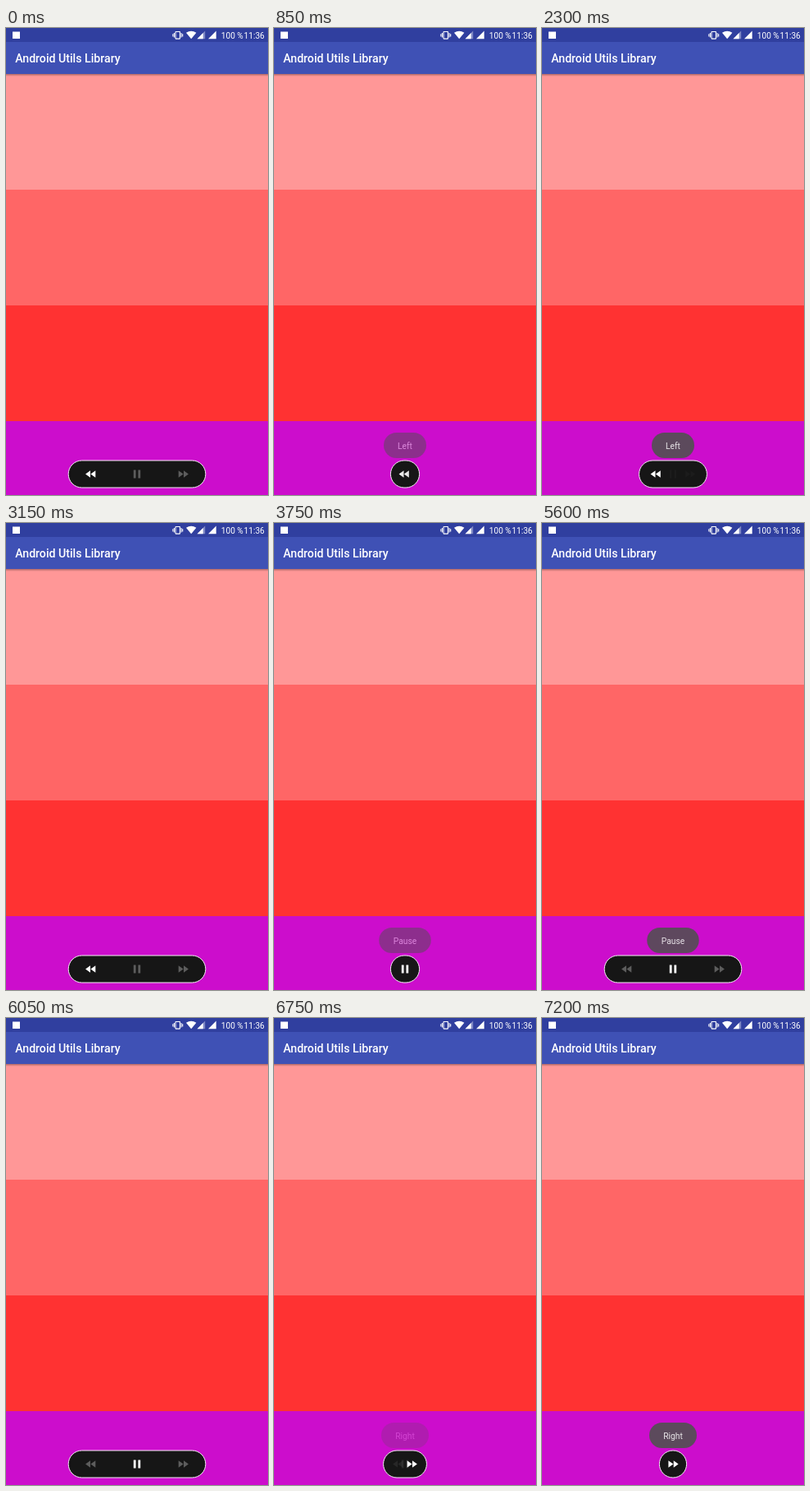
Animation of 320 by 569 pixels, one loop 8000 ms. Source, as an HTML page:

```html
<!DOCTYPE html>
<html lang="en">
<head>
<meta charset="utf-8">
<title>Android Utils Library</title>
<style>
  html, body { margin: 0; width: 100%; height: 100%; overflow: hidden; }
  svg { display: block; width: 100vw; height: 100vh; }
  text { font-family: Roboto, sans-serif; fill: #fff; }
</style>
</head>
<body>
<svg viewBox="0 0 320 569" preserveAspectRatio="none">
  <defs>
    <linearGradient id="shade" x2="0" y2="1">
      <stop stop-color="#000" stop-opacity=".32"/>
      <stop offset="1" stop-color="#000" stop-opacity="0"/>
    </linearGradient>
  </defs>

  <rect y="56" width="320" height="141" fill="#ff9797"/>
  <rect y="197" width="320" height="141" fill="#ff6666"/>
  <rect y="338" width="320" height="141" fill="#ff3232"/>
  <rect y="479" width="320" height="90" fill="#cc0dcc"/>
  <rect y="56" width="320" height="3" fill="url(#shade)"/>
  <rect width="320" height="56" fill="#3f51b5"/>
  <rect width="320" height="17" fill="#303f9f"/>
  <text x="11.2" y="42" font-size="14.15" font-weight="500">Android Utils Library</text>

  <g fill="#fff">
    <rect x="8" y="4.5" width="9" height="8.5"/>
    <path transform="translate(203.3 2.3) scale(.54)" d="M0 15h2V9H0zM3 17h2V7H3zM22 9v6h2V9zM19 17h2V7h-2zM16.5 3h-9C6.67 3 6 3.67 6 4.5v15c0 .83.67 1.5 1.5 1.5h9c.83 0 1.5-.67 1.5-1.5v-15c0-.83-.67-1.5-1.5-1.5zM16 19H8V5h8z"/>
    <path d="M226.2 13.3L220 5.8Q226.2 1.6 232.4 5.8Z"/>
    <path d="M233.5 13.3L243.2 3.6V13.3Z" opacity=".4"/>
    <path d="M233.5 13.3L240.7 6.1V13.3Z"/>
    <path d="M247 13.3L256.7 3.6V13.3Z"/>
  </g>
  <text x="262.8" y="12.5" font-size="10.1">100 %</text>
  <text x="290.6" y="12.5" font-size="10.1">11:36</text>

  <g id="toast">
    <rect id="bubble" y="493" height="31" rx="15.5" fill="#5c4a5c"/>
    <text id="label" x="160" y="512.6" font-size="10.3" text-anchor="middle" style="fill:#e8e6e8"></text>
  </g>

  <rect id="pill" y="527" height="33" rx="16.5" fill="#161616" stroke="#f4eef4"/>
  <path class="icon" d="M11 18V6l-8.5 6zM11.5 12l8.5 6V6z"/>
  <path class="icon" d="M6 19h4V5H6zM14 5v14h4V5z"/>
  <path class="icon" d="M4 18l8.5-6L4 6zM13 6v12l8.5-6z"/>
</svg>
<script>
const LOOP = 8000, MOVE = 300, FADE = 500;
const CX = 160, CY = 543.5, GAP = 56.3;

// Each pick closes the pill, shows a toast, then opens the pill again.
const picks = [
  { item: 0, close: 574, show: 680, open: 2276, hide: 2590, text: 'Left', width: 52 },
  { item: 1, close: 3474, show: 3585, open: 5055, hide: 5530, text: 'Pause', width: 63.5 },
  { item: 2, close: 6526, show: 6685, open: Infinity, hide: Infinity, text: 'Right', width: 58 }
];

const $ = id => document.getElementById(id);
const toast = $('toast'), bubble = $('bubble'), label = $('label'), pill = $('pill');
const icons = document.querySelectorAll('.icon');

const unit = (t, start, span) => Math.min(1, Math.max(0, (t - start) / span));
const smooth = x => (1 - Math.cos(Math.PI * x)) / 2;
const overshoot = x => (x - 1) ** 2 * (3 * (x - 1) + 2) + 1;

function drawPill(spread, active, others) {
  const half = 16.6 + 67.2 * spread;
  pill.setAttribute('x', CX - half);
  pill.setAttribute('width', 2 * half);
  icons.forEach((icon, i) => {
    const x = CX + (i - 1) * GAP * spread;
    icon.setAttribute('transform', `translate(${x} ${CY}) scale(.7) translate(-12 -12)`);
    icon.setAttribute('fill', i === active ? '#fff' : '#5c5c5c');
    icon.setAttribute('opacity', i === active ? 1 : others);
  });
}

function drawToast({ text, width }, alpha) {
  toast.setAttribute('opacity', alpha);
  bubble.setAttribute('x', CX - width / 2);
  bubble.setAttribute('width', width);
  label.textContent = text;
}

function render(t) {
  const pick = picks.filter(p => t >= p.close).pop();
  if (!pick) {
    drawPill(1, 0, 1);
    drawToast(picks[0], 0);
    return;
  }
  const closing = unit(t, pick.close, MOVE), opening = unit(t, pick.open, MOVE);
  const opened = t >= pick.open;
  drawPill(opened ? overshoot(opening) : 1 - smooth(closing), pick.item, opened ? opening : 1 - closing);

  const shown = 1 - (1 - unit(t, pick.show, FADE)) ** 2;
  const hidden = unit(t, pick.hide, FADE) ** 2;
  drawToast(pick, shown * (1 - hidden));
}

const begin = performance.now();
function tick() {
  render((performance.now() - begin) % LOOP);
  requestAnimationFrame(tick);
}
tick();
</script>
</body>
</html>
```
